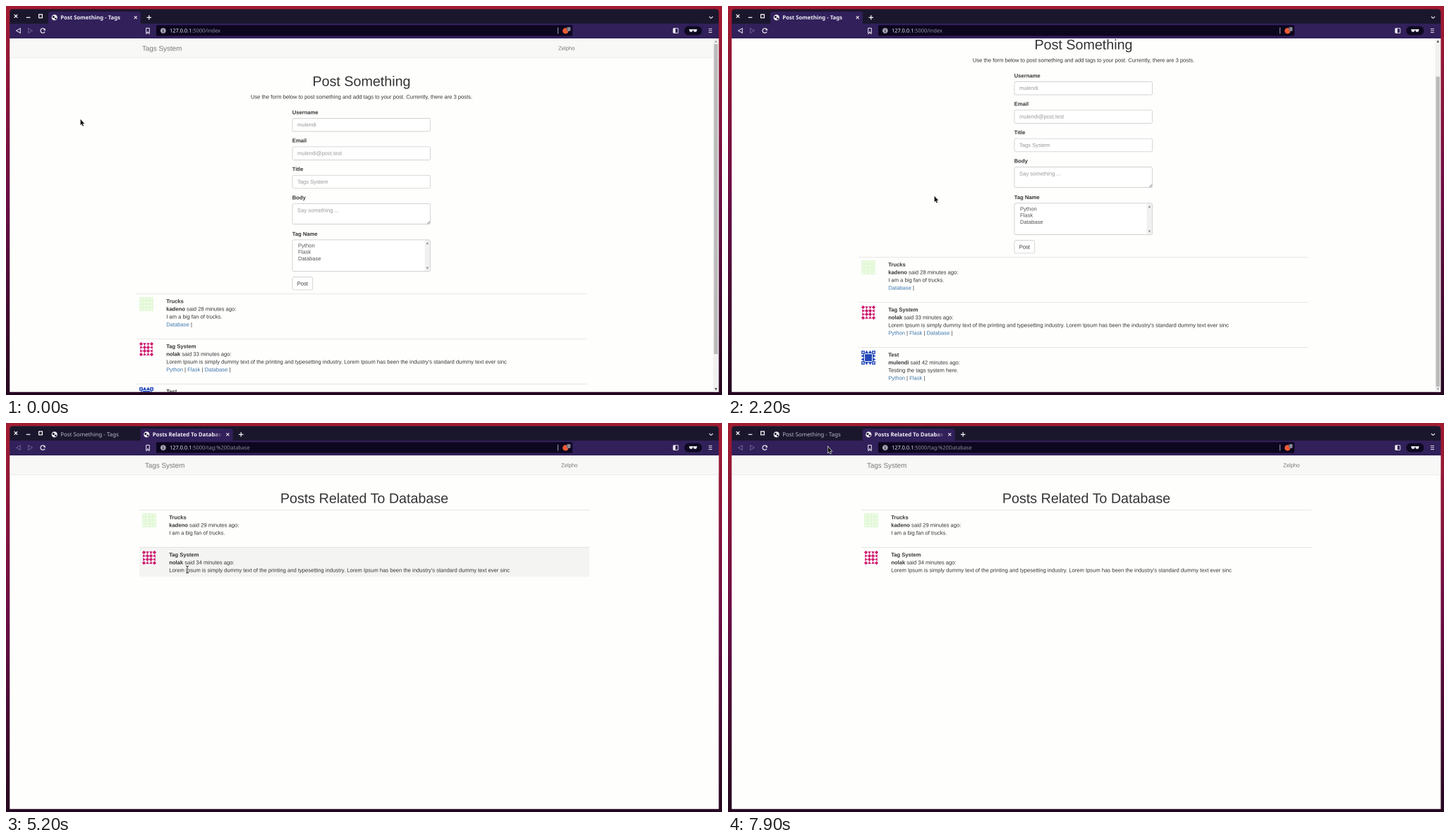
Recreate the animation shown at these times as an HTML page with a canvas. Size 1015x552 px, loop 8 s.

```html
<!DOCTYPE html>
<html lang="en">
<head>
<meta charset="utf-8">
<title>Tags</title>
<style>
html, body { margin: 0; width: 100%; height: 100%; overflow: hidden; background: #260720; }
canvas { display: block; width: 1015px; height: 552px; }
</style>
</head>
<body>
<canvas id="stage"></canvas>
<script>
const W = 1015, H = 552, DENSITY = 2, LOOP = 8000, STEP = 100;
const canvas = document.getElementById('stage');
canvas.width = W * DENSITY;
canvas.height = H * DENSITY;
const ctx = canvas.getContext('2d');
ctx.scale(DENSITY, DENSITY);
ctx.textRendering = 'geometricPrecision';

const PAGE = '"Liberation Sans", Arial, sans-serif';
const UI = '"Noto Sans", "Open Sans", sans-serif';
const SIZE = 7.64, LEAD = 10.94;
const INK = '#333', LINK = '#3b76ae', LINK_OVER = '#23527c';
const PURPLE = '#31205a', DARK = '#1a172d', FIELD = '#0c061f', WHITE = '#f1eff6', DIM = '#6d6190';
const EDGE = { x: 5.3, y: 46, right: 1010.4, bottom: 547.7 };
const LOREM = "Lorem Ipsum is simply dummy text of the printing and typesetting industry. " +
  "Lorem Ipsum has been the industry's standard dummy text ever sinc";

const posts = [
  { title: 'Trucks', user: 'kadeno', age: 28, body: 'I am a big fan of trucks.', tags: ['Database'],
    look: { color: '#dff8d2', corner: 'frame', edge: 'frame', core: 'frame' } },
  { title: 'Tag System', user: 'nolak', age: 33, body: LOREM, tags: ['Python', 'Flask', 'Database'],
    look: { color: '#cf1a70', corner: 'diamond', edge: 'wedge', core: 'diamond' } },
  { title: 'Test', user: 'mulendi', age: 42, body: 'Testing the tags system here.', tags: ['Python', 'Flask'],
    look: { color: '#2449b8', corner: 'frame', edge: 'spike', core: 'block' } }
];

const start = { x: 106, y: 161 };
const moves = [
  { from: 500, to: 700, x: 293, y: 270 },
  { from: 2700, to: 3100, x: 196, y: 397, bow: 66 },
  { from: 3200, to: 3700, x: 245, y: 401 },
  { from: 5100, to: 5200, x: 257, y: 208 },
  { from: 5200, to: 5800, x: 231, y: 22 },
  { from: 5900, to: 6000, x: 221, y: 19 },
  { from: 6100, to: 6600, x: 397, y: 116, bow: -90 },
  { from: 6700, to: 7300, x: 591, y: 110 },
  { from: 7500, to: 7700, x: 159, y: 55 },
  { from: 7800, to: 7900, x: 142, y: 34 }
];

const ease = u => u * u * (3 - 2 * u);

function pointerAt(t) {
  let { x, y } = start;
  for (const m of moves) {
    if (t < m.from) break;
    const u = ease(Math.min(1, (t - m.from) / (m.to - m.from)));
    x += (m.x - x) * u + (m.bow || 0) * Math.sin(Math.PI * u);
    y += (m.y - y) * u;
  }
  return { x, y };
}

const scrollAt = t => t < 1800 ? 0 : t < 1900 ? 1.7 : t < 2200 ? 49 : 52;
const inside = (p, x, y, w, h) => p.x >= x && p.x <= x + w && p.y >= y && p.y <= y + h;

function rect(x, y, w, h, color) {
  ctx.fillStyle = color;
  ctx.fillRect(x, y, w, h);
}

function paint(fill, stroke, width = 1) {
  if (fill) { ctx.fillStyle = fill; ctx.fill(); }
  if (stroke) { ctx.strokeStyle = stroke; ctx.lineWidth = width; ctx.stroke(); }
}

function box(x, y, w, h, r, fill, stroke, width = 0.7) {
  ctx.beginPath();
  ctx.roundRect(x, y, w, h, r);
  paint(fill, stroke, width);
}

function arc(x, y, r, fill, stroke, from = 0, to = Math.PI * 2) {
  ctx.beginPath();
  ctx.arc(x, y, r, from, to);
  paint(fill, stroke, 1.2);
}

// Regular polygon; the first corner points along angle.
function ngon(n, x, y, r, angle, fill, stroke) {
  ctx.beginPath();
  for (let i = 0; i < n; i++) {
    const a = angle + i * 2 * Math.PI / n;
    ctx.lineTo(x + r * Math.cos(a), y + r * Math.sin(a));
  }
  ctx.closePath();
  paint(fill, stroke);
}

function line(x1, y1, x2, y2, color, width = 1) {
  ctx.beginPath();
  ctx.moveTo(x1, y1);
  ctx.lineTo(x2, y2);
  paint(null, color, width);
}

// y is the centre of the text line; returns the right end.
function text(str, x, y, { size = SIZE, color = INK, weight = 400, align = 'left', font = PAGE } = {}) {
  ctx.font = `${weight} ${size}px ${font}`;
  ctx.textAlign = align;
  ctx.fillStyle = color;
  ctx.fillText(str, x, y + size * 0.3465);
  return x + ctx.measureText(str).width;
}

const ui = (str, x, y, color, weight = 400, size = 7.4) =>
  text(str, x, y, { size, color, weight, font: UI });
const bold = (str, x, y) => text(str, x, y, { weight: 700 });
const up = (x, y, color) => ngon(3, x, y, 2, -Math.PI / 2, color);
const down = (x, y, color) => ngon(3, x, y, 2, Math.PI / 2, color);

function cross(x, y, r, color, width = 1) {
  line(x - r, y - r, x + r, y + r, color, width);
  line(x - r, y + r, x + r, y - r, color, width);
}

const tiles = {
  frame: (x, y, a, c) => box(x - 1.7, y - 1.7, 3.4, 3.4, 0, null, c, 1.4),
  block: (x, y, a, c) => rect(x - 2.5, y - 2.5, 5, 5, c),
  diamond: (x, y, a, c) => ngon(4, x, y, 2.6, 0, c),
  wedge: (x, y, a, c) => ngon(3, x, y, 2.6, a + Math.PI, c),
  spike: (x, y, a, c) => ngon(3, x, y, 3, a, c)
};

// 4 x 4 tiles, edge tiles turned outwards
function avatar(look, left, top) {
  for (let i = 0; i < 4; i++) for (let j = 0; j < 4; j++) {
    const sideX = i % 3 === 0, sideY = j % 3 === 0;
    const kind = sideX && sideY ? look.corner : sideX || sideY ? look.edge : look.core;
    const angle = Math.atan2(sideY ? j - 1.5 : 0, sideX ? i - 1.5 : 0);
    tiles[kind](left + 2.5 + i * 5, top + 2.5 + j * 5, angle, look.color);
  }
}

function heading(name, left) {
  rect(EDGE.x, 46, 1006, 27.4, '#f8f8f7');
  rect(EDGE.x, 73.4, 1006, 0.6, '#e4e4e4');
  text('Tags System', left + 8, 60, { size: 9.84, color: '#777' });
  text('Zelpho', left + 598, 60, { color: '#777' });
  text(name, left + 319, 106.5, { size: 19.7, align: 'center' });
}

function post(p, x, y, h, pointer, late, tags) {
  if (inside(pointer, x, y, 638, h)) rect(x, y, 638, h, '#f4f4f3');
  rect(x, y - 0.3, 638, 0.6, '#d6d6d6');
  avatar(p.look, x + 4, y + 4.6);
  const left = x + 42.2, row = n => y + 10.4 + n * LEAD;
  bold(p.title, left, row(0));
  const end = bold(p.user, left, row(1));
  text(` said ${p.age + late} minutes ago:`, end, row(1));
  text(p.body, left, row(2));
  let at = left;
  for (const tag of tags) {
    const over = inside(pointer, at, row(3) - 4, ctx.measureText(tag).width, 9);
    const stop = text(tag, at, row(3), { color: over ? LINK_OVER : LINK });
    if (over) rect(at, row(3) + 3.4, stop - at, 0.6, LINK_OVER);
    at = text(' | ', stop, row(3));
  }
}

function field(label, hint, y, h = 18.6) {
  bold(label, 405.8, y);
  box(406, y + 8.7, 195.6, h, 2.2, '#fff', '#c4c4c4');
  text(hint, 413, y + 17.8, { color: '#999' });
}

function indexPage(scroll, pointer) {
  ctx.save();
  ctx.translate(0, -scroll);
  heading('Post Something', 185);
  text('Use the form below to post something and add tags to your post. Currently, there are 3 posts.',
    504, 129, { align: 'center' });
  const hints = { Username: 'mulendi', Email: 'mulendi@post.test', Title: 'Tags System', Body: 'Say something ...' };
  Object.entries(hints).forEach(([label, hint], i) =>
    field(label, hint, 150.7 + i * 40.4, label === 'Body' ? 29 : 18.6));
  for (const d of [2, 4]) line(601 - d, 309, 601, 309 - d, '#888', 0.6);
  field('Tag Name', '', 323.2, 44.6);
  ['Python', 'Flask', 'Database'].forEach((o, i) => text(o, 414, 339.8 + i * 9.25, { color: '#555' }));
  rect(593.6, 332.5, 7.4, 43.2, '#f0f0f0');
  up(597.4, 337, '#8a8a8a');
  down(597.4, 371.5, '#8a8a8a');
  box(406, 384.6, 28.8, 18.2, 2.2, '#fff', '#c4c4c4');
  text('Post', 420.4, 393.8, { align: 'center' });
  const local = { x: pointer.x, y: pointer.y + scroll };
  posts.forEach((p, i) => post(p, 185, 408.4 + i * 64, 52.5, local, 0, p.tags));
  ctx.restore();

  rect(1002.6, 46, 8, 502, '#f1f1f0');
  rect(1003.6, 54 + scroll * 0.89, 5.4, 440, '#bcbbbb');
  up(1006.4, 50.6, scroll < 1 ? '#999' : INK);
  down(1006.4, 543.2, scroll > 51 ? '#999' : INK);
}

function tagPage(pointer) {
  heading('Posts Related To Database', 189);
  posts.slice(0, 2).forEach((p, i) => post(p, 189, 123.5 + i * 53, 41.6, pointer, 1, []));
}

function globe(x, y) {
  arc(x, y, 4.1, WHITE);
  arc(x - 1.4, y - 0.8, 1.5, DARK);
  arc(x + 1.6, y + 1.5, 1.3, DARK);
}

function tab(title, x, active, loading) {
  if (active) box(x, 8, 131, 19, [3, 3, 0, 0], PURPLE);
  if (loading) arc(x + 8.7, 16.3, 3.4, null, '#cfcbe0', -1.6, 2.6);
  else globe(x + 8.7, 16.3);
  if (!active) return ui(title, x + 17.2, 16.3, '#b9b6c8', 400, 7.95);
  ui(title, x + 17.2, 16.3, WHITE, 600, 7.75);
  const fade = ctx.createLinearGradient(x + 104, 0, x + 116, 0);
  fade.addColorStop(0, PURPLE + '00');
  fade.addColorStop(1, PURPLE);
  rect(x + 104, 10, 26, 14, fade);
  cross(x + 123.7, 16.3, 2, '#fff');
}

function toolbar(second, loading, pointer) {
  ngon(3, 18.4, 35, 3.8, Math.PI, null, second ? DIM : WHITE);
  ngon(3, 33.6, 35, 3.8, 0, null, DIM);
  if (loading) cross(52.4, 35, 2.8, WHITE, 1.2);
  else {
    arc(52.2, 35, 3.2, null, WHITE, 0.5, 5.5);
    ngon(3, 54.8, 33.6, 1.9, 0.8, WHITE);
  }
  box(198.7, 31.4, 4.6, 7.2, 0.4, null, WHITE, 1);
  ngon(3, 201, 38.8, 2.2, -Math.PI / 2, PURPLE, WHITE);
  rect(199, 39.4, 4, 2, PURPLE);

  box(213, 27.3, 590, 15.2, 2, inside(pointer, 213, 27, 590, 15) ? '#150d2c' : FIELD);
  arc(222.8, 35, 3.9, '#a9a6b3');
  rect(222.3, 32.6, 1, 1, FIELD);
  rect(222.3, 34.3, 1, 3, FIELD);
  const end = ui('127.0.0.1', 232, 35, WHITE);
  ui(second ? ':5000/tag:%20Database' : ':5000/index', end, 35, '#96929f');
  rect(782, 30.5, 0.8, 9, '#c5c2cf');
  arc(793.2, 35.3, 4.2, '#ee5a35');
  box(795, 29.8, 5.6, 6, 1.4, '#6e6b78');
  text('2', 797.8, 32.8, { size: 5, color: '#fff', align: 'center', font: UI });

  box(945.9, 31.7, 7, 6.6, 1, null, WHITE, 0.9);
  rect(946, 31.8, 3, 6.4, WHITE);
  box(961.5, 28.6, 25, 12.8, 6.4, '#0e0920');
  rect(968.4, 33, 11.2, 1.2, WHITE);
  for (const x of [968.8, 974.6]) box(x, 33, 4.6, 3.8, [0, 0, 2, 2], WHITE);
  for (let i = -1; i < 2; i++) rect(996, 34.5 + i * 2.6, 5, 0.9, WHITE);
}

function browser(second, loading, pointer) {
  const sky = ctx.createLinearGradient(0, 0, 0, H);
  sky.addColorStop(0, '#a21c31');
  sky.addColorStop(0.5, '#690d45');
  sky.addColorStop(1, '#260720');
  rect(0, 0, W, H, sky);
  const width = EDGE.right - EDGE.x;
  box(EDGE.x, 4.5, width, 30, [4, 4, 0, 0], DARK);
  rect(EDGE.x, 25, width, 21, PURPLE);
  cross(14, 14.4, 2.3, '#fff', 1.2);
  rect(28.8, 15.7, 5.6, 1.2, '#fff');
  box(46.6, 12, 4.8, 4.8, 0, null, '#fff', 1.2);
  tab('Post Something - Tags', 60, !second);
  if (second) tab('Posts Related To Database', 190.6, true, loading);
  const plus = second ? 333.2 : 202.8;
  line(plus - 3.2, 16.3, plus + 3.2, 16.3, '#fff', 1.2);
  line(plus, 13.1, plus, 19.5, '#fff', 1.2);
  for (const d of [-2.6, 2.6]) line(999.5 + d, 15, 999.5, 17.5, '#fff', 1.1);
  toolbar(second, loading, pointer);
}

const cursors = {
  arrow() {
    const tip = new Path2D('M-.4-.4V8.1L1.4 6.5 2.9 9.6 4.1 9 2.7 6H5.2Z');
    ctx.strokeStyle = '#fff';
    ctx.lineWidth = 1.1;
    ctx.stroke(tip);
    ctx.fillStyle = '#111';
    ctx.fill(tip);
  },
  hand() {
    box(-0.9, 0, 1.9, 8, 0.9, '#111', '#fff');
    box(-2.4, 4.2, 7, 5.6, 2, '#111', '#fff');
    rect(-0.5, 3.5, 1.1, 2, '#111');
  },
  beam() {
    for (const [color, width] of [['#fff', 2], ['#222', 0.9]]) {
      line(0, -4.8, 0, 4.8, color, width);
      for (const y of [-4.8, 4.8]) line(-2, y, 2, y, color, width);
    }
  }
};

function draw(t) {
  const pointer = pointerAt(t);
  const second = t >= 4500;
  const onLink = !second && t >= 3200 && inside(pointer, 227, 395, 33, 10);
  browser(second, second && t < 4900, pointer);

  ctx.save();
  ctx.beginPath();
  ctx.rect(EDGE.x, EDGE.y, EDGE.right - EDGE.x, EDGE.bottom - EDGE.y);
  ctx.clip();
  rect(0, 0, W, H, '#fefefd');
  if (!second) indexPage(scrollAt(t), pointer);
  else if (t >= 4600) tagPage(pointer);
  if (onLink) {
    box(EDGE.x, 535.5, 113, 13, [0, 2.5, 0, 0], DARK);
    ui('127.0.0.1:5000/tag: Database', 8.6, 541.6, WHITE, 500, 7.7);
  }
  ctx.restore();

  const kind = onLink && t < 4300 ? 'hand' : t >= 5200 && t < 5300 ? 'beam' : 'arrow';
  ctx.save();
  ctx.translate(pointer.x, pointer.y);
  cursors[kind]();
  ctx.restore();
}

function loop() {
  draw(Math.floor(performance.now() % LOOP / STEP) * STEP);
  requestAnimationFrame(loop);
}
loop();
</script>
</body>
</html>
```
